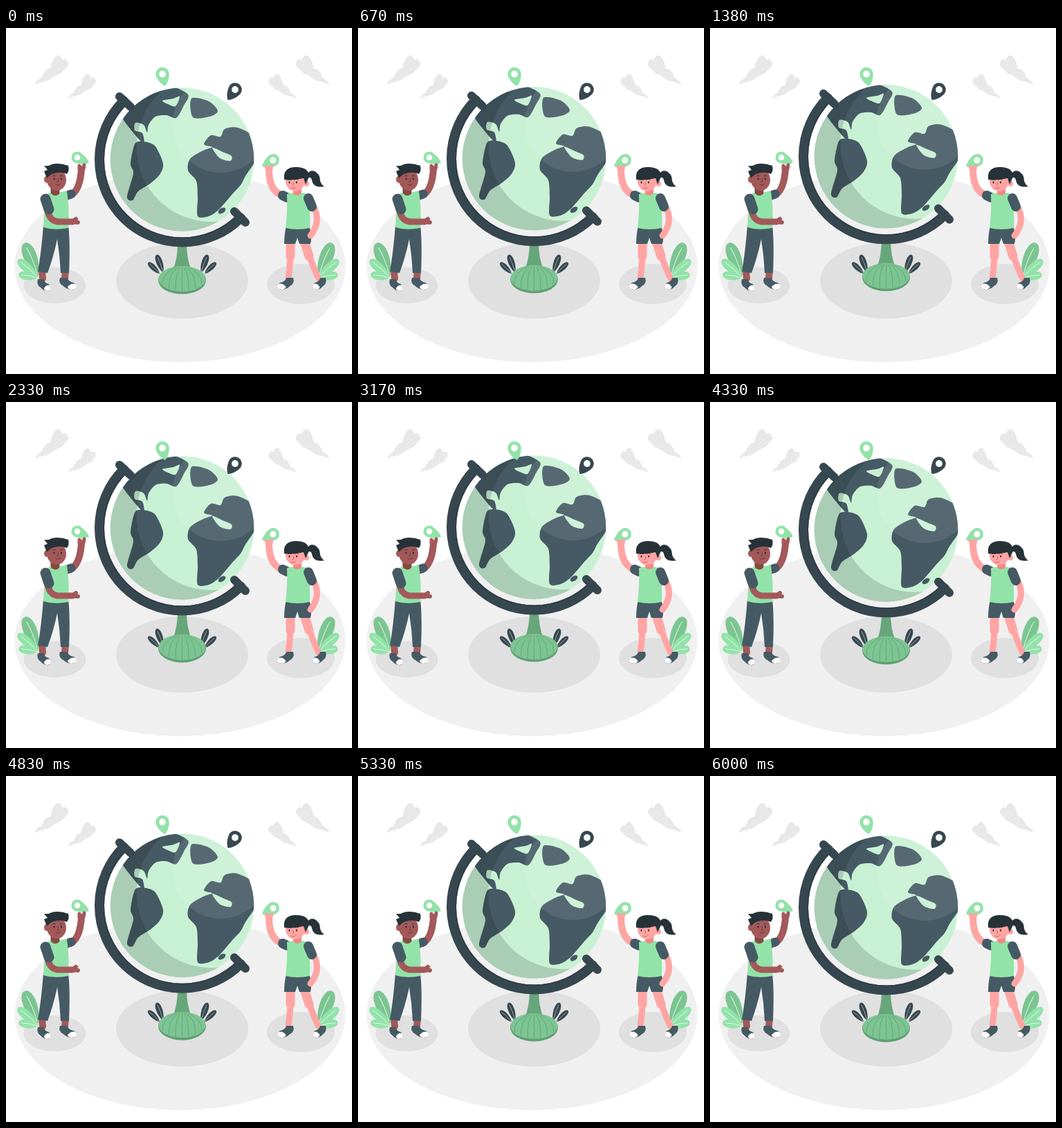
Animation of 500x500 px, one loop 6040 ms. Source, as an HTML page with a canvas:

```html
<!DOCTYPE html>
<html lang="en">
<head>
<meta charset="utf-8">
<title>Globe</title>
<style>
html, body { margin: 0; width: 100%; height: 100%; overflow: hidden; background: #fff; }
canvas { display: block; width: 500px; height: 500px; }
</style>
</head>
<body>
<canvas id="stage"></canvas>
<script>
const LOOP = 6040, LIFT = 9, TAU = Math.PI * 2;
const GREEN = '#92e3a9', MOSS = '#7cc592', WATER = '#c8f1d4';
const DARK = '#37474f', SLATE = '#455a64', INK = '#263238';
const BROWN = '#a3595a', PINK = '#ffa5a4', CLOUD = '#e8e8e8';
const canvas = document.getElementById('stage');
const c = canvas.getContext('2d');
const dpr = window.devicePixelRatio || 1;
canvas.width = canvas.height = 500 * dpr;

function fill(d, color) {
  c.fillStyle = color;
  c.fill(new Path2D(d));
}

function line(d, color, width) {
  c.strokeStyle = color;
  c.lineWidth = width;
  c.stroke(new Path2D(d));
}

function oval(x, y, rx, ry, color, turn = 0) {
  c.beginPath();
  c.ellipse(x, y, rx, ry, turn, 0, TAU);
  c.fillStyle = color;
  c.fill();
}

function placed(x, y, draw) {
  c.save();
  c.translate(x, y);
  draw();
  c.restore();
}

// Draws once as given and once mirrored; sum is left x + right x
function pair(sum, draw) {
  draw();
  placed(sum, 0, () => { c.scale(-1, 1); draw(); });
}

// Smooth closed shape through a few key points, written as "x,y x,y ..."
function blob(text, color) {
  const p = text.split(' ').map(s => s.split(',').map(Number)), n = p.length;
  const at = (i, k) => p[(i + n) % n][k];
  const lean = (i, k, s) => at(i, k) + s * (at(i + 1, k) - at(i - 1, k)) / 7;
  c.beginPath();
  c.moveTo(...p[0]);
  for (let i = 0; i < n; i++) {
    c.bezierCurveTo(lean(i, 0, 1), lean(i, 1, 1), lean(i + 1, 0, -1), lean(i + 1, 1, -1), at(i + 1, 0), at(i + 1, 1));
  }
  c.fillStyle = color;
  c.fill();
}

function pin(x, y, r, tipX, tipY, color) {
  const len = Math.hypot(tipX - x, tipY - y);
  placed(x, y, () => {
    c.rotate(Math.atan2(tipY - y, tipX - x));
    c.beginPath();
    c.arc(0, 0, r, 1.2, -1.2);
    c.quadraticCurveTo(len * 0.7, -r * 0.7, len, 0);
    c.quadraticCurveTo(len * 0.7, r * 0.7, r * Math.cos(1.2), r * Math.sin(1.2));
    c.fillStyle = color;
    c.fill();
  });
  oval(x, y, r / 2, r / 2, '#fff');
}

// Leaf growing from (x, y) with a rounded tip and a pale vein
function leaf(x, y, turn, len, w, color, vein) {
  placed(x, y, () => {
    c.rotate(turn);
    fill(`M0 0C${-w} ${-len * 0.3} ${-w} ${-len} 0 ${-len}C${w} ${-len} ${w} ${-len * 0.3} 0 0Z`, color);
    line(`M0 ${-len * 0.05}Q${w * 0.2} ${-len * 0.5} 0 ${-len * 0.85}`, vein, 0.9);
  });
}

function cloud(x, y, size) {
  placed(x, y, () => {
    c.transform(size, -0.58 * size, 0, size, 0, 0);
    const puff = (at, rx, ry) => {
      c.beginPath();
      c.ellipse(at, 0, rx, ry, 0, Math.PI, TAU);
      c.fillStyle = CLOUD;
      c.fill();
    };
    puff(7, 7, 5);
    puff(18, 9, 12);
    puff(31, 10, 24);
    puff(40, 8, 13);
    fill('M0 0H48L38 5Q28 3 20 5Q10 1 0 0Z', CLOUD);
  });
}

function scenery() {
  pair(509, () => { cloud(42, 82, 1); cloud(90, 102, 0.83); });
  oval(251.5, 345, 239, 138, '#f0f0f0');
  oval(254.5, 365, 95.5, 55, '#e0e0e0');
  oval(70.5, 372, 45, 26, '#e0e0e0');
  oval(426, 370, 49, 29, '#e0e0e0');
  pair(509, () => {
    leaf(227, 353, -0.35, 27, 6, DARK, '#90a4ae');
    leaf(222, 355, -0.8, 23, 5, DARK, '#90a4ae');
  });
  pair(498, () => {
    leaf(46, 358, -0.38, 51, 13, MOSS, '#e2f8e8');
    leaf(46, 360, -0.85, 38, 9, GREEN, '#e2f8e8');
    leaf(46, 361, -1.4, 28, 8, GREEN, '#e2f8e8');
  });
}

function shoe(x, y, flip) {
  placed(x, y, () => {
    c.scale(flip, 1);
    fill('M0 0L10 0Q13 6 20 7Q26 12 20 17Q11 18 5 12Q-3 8 0 0Z', SLATE);
    fill('M11 13Q18 6 23 10Q25 17 17 17Q12 17 11 13Z', '#fff');
  });
}

function face(x, y, lip) {
  for (const dx of [-5.5, 5]) {
    oval(x + dx, y, 1.1, 1.5, INK);
    line(`M${x + dx - 2} ${y - 4}q2 -2 4 0`, INK, 0.8);
  }
  line(`M${x} ${y}q2 4 -1 5M${x - 3} ${y + 8}q4 3 7 -1`, lip, 1);
}

function boy() {
  line('M52 350L53 362M86 350L85 362', BROWN, 10);
  shoe(46, 363, 0.8);
  shoe(78, 361, 1);
  fill('M54 285H90Q93 310 91 354H79Q78 330 74 305Q69 330 60 354L46 352Q51 325 54 285Z', SLATE);

  pin(103, 187, 8.5, 120, 195, GREEN);
  line('M93 242Q107 235 109 204', BROWN, 10);
  line('M106 204L106 199M112 204L113 198', BROWN, 5);
  line('M83 244L94 240', SLATE, 13);

  line('M71 230V239', '#86483f', 13);
  fill('M57 241L64 238Q72 247 79 237L88 236Q92 262 90 289Q70 293 54 288Z', GREEN);

  line('M60 264Q63 278 74 280L96 280', BROWN, 9);
  line('M96 280L104 281M97 279L101 276', BROWN, 6);
  line('M57 247L62 262', SLATE, 15);

  oval(73, 219, 14, 16, BROWN, -0.1);
  oval(59, 219, 4, 5, BROWN);
  fill('M59 217L55 207L60 205L55 199Q62 200 66 197Q77 194 90 199Q92 206 88 211Q79 207 70 210Q64 211 59 217Z', INK);
  face(75, 218, '#6b332f');
}

function girl() {
  line('M411 308Q412 335 408 361M432 308Q438 332 451 361', PINK, 9);
  line('M411 308L411 330M431 308L438 330', PINK, 13);
  shoe(415, 361, -0.95);
  shoe(462, 361, -0.78);
  fill('M405 286H438Q443 300 440 312H424L421 303L418 312H402Q402 298 405 286Z', SLATE);

  pin(386, 191, 9, 370, 200, GREEN);
  line('M380 205Q380 236 401 243', PINK, 10);
  line('M377 203L376 200M383 204L384 200', PINK, 5);
  line('M400 242L406 245', SLATE, 14);

  line('M446 261Q455 281 440 300', PINK, 9);
  line('M421 231V240', '#f28787', 12);
  fill('M406 240L414 238Q421 246 428 238L437 240Q440 264 439 289Q421 293 404 289Q407 264 406 240Z', GREEN);
  line('M437 246L442 258', SLATE, 14);

  fill('M435 213Q438 204 446 207Q454 211 454 221Q456 227 460 229Q444 232 442 220Q441 214 435 217Z', INK);
  oval(418, 221, 14, 15, PINK);
  oval(434, 225, 4, 4, PINK);
  fill('M402 219Q400 202 417 201Q438 200 438 215L433 226L430 217Q415 221 402 219Z', INK);
  face(415, 223, '#d95f5f');
}

function stand() {
  fill('M248 310H261Q261 334 268 350H241Q248 334 248 310Z', '#67a57a');
  oval(254.5, 364.5, 34.5, 20, '#5f9f73');
  oval(254.5, 362.5, 34, 18.5, MOSS);
  for (let i = -3; i <= 3; i++) {
    line(`M${254.5 + i * 3} 346Q${254.5 + i * 10} 355 ${254.5 + i * 9.5} ${380 - i * i}`, '#67a57a', 1);
  }
}

function land() {
  blob('166,124 183,106 206,92 236,84 263,96 257,112 246,130 232,126 216,128 206,140 204,151 199,140 187,137 186,148 197,152 199,167 183,150', SLATE);
  blob('226,105 242,102 251,99 245,113 234,110', WATER);
  blob('186,168 197,164 215,170 227,196 222,212 208,225 191,236 183,249 175,244 184,210 180,196', SLATE);
  blob('268,102 293,106 306,120 294,128 270,129', SLATE);
  blob('286,168 296,155 310,157 316,146 335,144 362,160 362,188 346,214 339,227 327,240 308,262 293,272 277,272 277,245 275,221 263,206 266,189 285,177 298,172', SLATE);
  blob('298,173 313,179 326,185 324,192 309,188', WATER);
  oval(312, 264, 6, 3.5, SLATE, -0.6);
}

function globe() {
  const x = 254.5, y = 190, r = 103.8, turn = Math.PI / 4;
  stand();
  c.save();
  c.beginPath();
  c.arc(x, y, r, 0, TAU);
  c.fillStyle = WATER;
  c.fill();
  c.clip();
  land();
  oval(x + 56, y - 51, 70, 70, 'rgba(255,255,255,0.09)');
  // shade outside an offset disc of light
  c.beginPath();
  c.rect(x - 120, y - 120, 240, 240);
  c.arc(x + 42, y - 18, 108, 0, TAU);
  c.fillStyle = 'rgba(0,0,0,0.15)';
  c.fill('evenodd');
  c.restore();

  const band = (radius, color, width) => {
    c.beginPath();
    c.arc(x, y, radius, turn, turn + Math.PI);
    c.strokeStyle = color;
    c.lineWidth = width;
    c.stroke();
  };
  band(119.5, DARK, 14);
  band(113.5, '#303e46', 2);
  line('M164 99L180 114M330 265L346 281', DARK, 12);
}

function frame(t) {
  const rise = (1 - Math.cos((t + 60) / LOOP * TAU)) / 2;
  c.setTransform(dpr, 0, 0, dpr, 0, 0);
  c.lineCap = c.lineJoin = 'round';
  c.fillStyle = '#fff';
  c.fillRect(0, 0, 500, 500);
  scenery();
  boy();
  girl();
  placed(0, -LIFT * rise, globe);
  pin(226, 66.5, 9.8, 230, 84, GREEN);
  pin(331, 89, 9.8, 320.5, 104, DARK);
}

const start = performance.now();
function tick(now) {
  frame(Math.max(0, now - start) % LOOP);
  requestAnimationFrame(tick);
}
requestAnimationFrame(tick);
</script>
</body>
</html>
```
